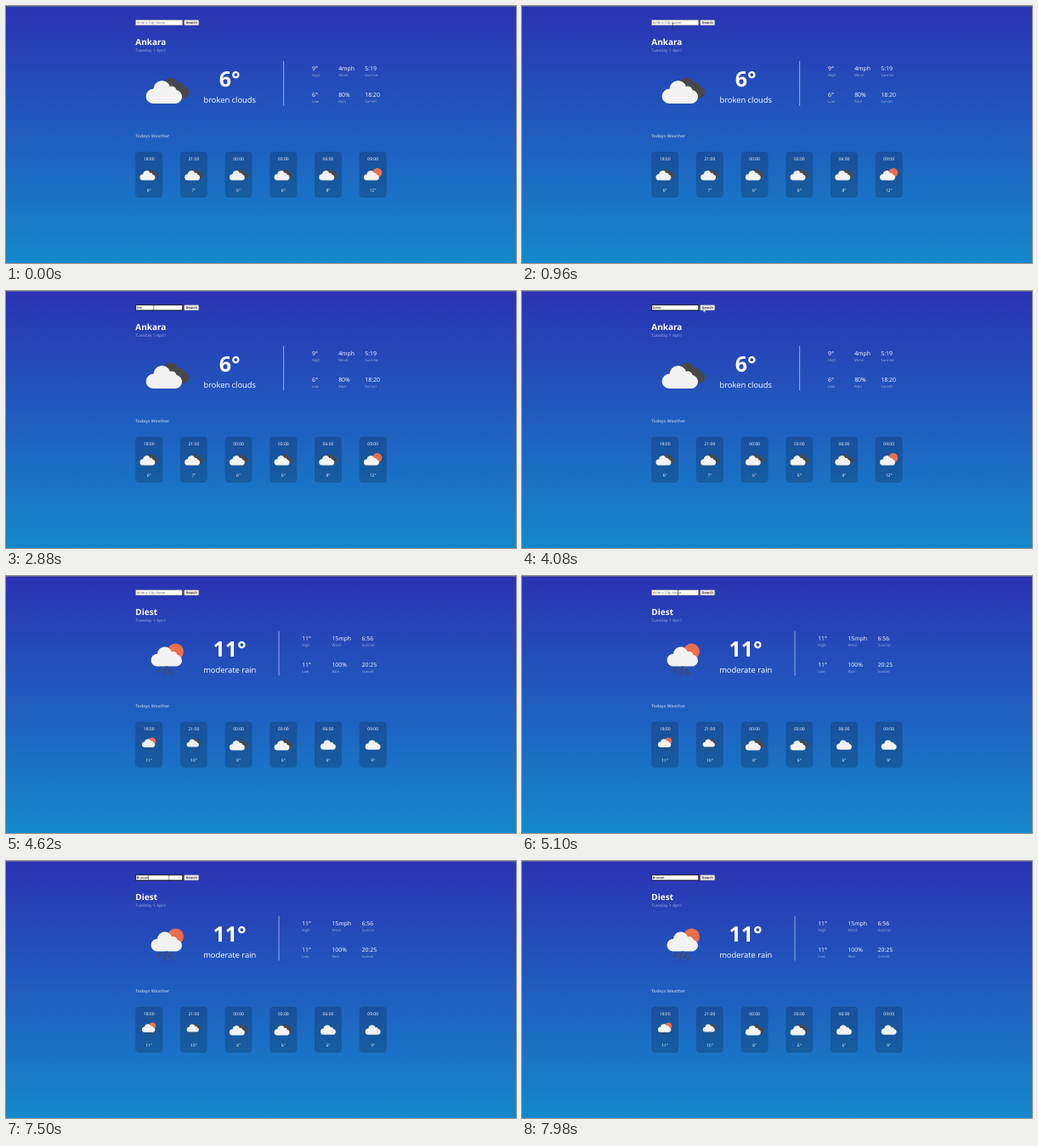
An HTML page that plays this animation: 600x303 px, repeating every 8 s.

```html
<!DOCTYPE html>
<html lang="en">
<head>
<meta charset="utf-8">
<title>Weather</title>
<style>
html, body { margin: 0; width: 100%; height: 100%; overflow: hidden; background: #2b32b2; }
svg { display: block; width: 100%; height: 100%; }
text { font-family: "Open Sans", "Noto Sans", sans-serif; fill: #fff; text-rendering: geometricPrecision; white-space: pre; }
.mid { text-anchor: middle; }
.dim { fill-opacity: .55; }
.form { font-family: "Liberation Sans", sans-serif; font-size: 4.17px; fill: #000; }
</style>
</head>
<body>
<svg id="stage" viewBox="0 0 600 303" preserveAspectRatio="none">
  <defs>
    <linearGradient id="sky" x1="0" y1="0" x2="0" y2="1">
      <stop offset="0" stop-color="#2b32b2"/>
      <stop offset="1" stop-color="#1488cc"/>
    </linearGradient>
    <path id="cloud" d="M9 28.5A8.6 8.6 0 0 1 9.5 11.3A10 10 0 0 1 29 8.5A5.5 5.5 0 0 1 36.5 12.5A8.1 8.1 0 0 1 35.8 28.5Z"/>
  </defs>
  <rect width="600" height="303" fill="url(#sky)"/>
  <rect width="600" height="1" fill="#888" opacity=".5"/>
  <rect id="field" x="152.6" y="16.4" width="55.2" height="6.4" fill="#fff"/>
  <text id="typed" class="form" x="153.6" y="21.1"></text>
  <rect id="caret" y="17.3" width=".4" height="4.8"/>
  <rect x="209.6" y="16.5" width="17.2" height="6.2" rx=".9" fill="#efefef" stroke="#767676" stroke-width=".4"/>
  <text class="form mid" x="218.2" y="21.1">Search</text>
  <g id="cities"></g>
  <g id="pointer">
    <path id="beam" d="M-1-3H1M0-3V3M-1 3H1" fill="none" stroke="#222" stroke-width=".5"/>
    <path id="arrow" d="M0 0V4.8L1.1 3.8L1.9 5.5L2.7 5.1L1.9 3.5H3.4Z" fill="#fff" stroke="#222" stroke-width=".3"/>
  </g>
</svg>
<script>
const LOOP = 8000, TICK = 60;
const $ = id => document.getElementById(id);

const text = (x, y, size, str, cls = '', weight = 400) =>
  `<text x="${x}" y="${y}" font-size="${size}" font-weight="${weight}" class="${cls}">${str}</text>`;

const cloud = (x, y, scale, dark) =>
  `<use href="#cloud" transform="translate(${x} ${y}) scale(${scale})" fill="${dark ? '#48484a' : '#f2f2f2'}"/>`;
const sun = (x, y, r) => `<circle cx="${x}" cy="${y}" r="${r}" fill="#ec6e4c"/>`;
const rain = '<path d="M-8 9l-3 5M-1 8l-3 5M-3 15l-1.5 3M4 10l-3 5M6 15l-1.5 3" stroke="#48484a" stroke-width="1.6" stroke-linecap="round"/>';

// Icons are drawn around their own centre at headline size
const icons = {
  broken: cloud(-14, -16, .91, true) + cloud(-26, -12.5, 1),
  sunny: sun(12, -5, 13) + cloud(-26, -12.5, 1),
  plain: cloud(-22, -14, 1),
  rainDay: sun(9.5, -10, 9.5) + cloud(-20, -17, .86) + rain,
  rainNight: cloud(-9, -18, .64, true) + cloud(-20, -16, .8) + rain
};
const icon = (name, x, y, scale) =>
  `<g transform="translate(${x} ${y}) scale(${scale})">${icons[name]}</g>`;

const labels = ['High', 'Wind', 'Sunrise', 'Low', 'Rain', 'Sunset'];
const hours = ['18:00', '21:00', '00:00', '03:00', '06:00', '09:00'];

const cities = [
  { name: 'Ankara', temp: 6, sky: 'broken clouds', icon: 'broken', line: 326.7, cols: [360, 391.2, 422.3],
    facts: ['9°', '4mph', '5:19', '6°', '80%', '18:20'], temps: [6, 7, 6, 6, 8, 12],
    icons: ['broken', 'broken', 'broken', 'broken', 'broken', 'sunny'] },
  { name: 'Diest', temp: 11, sky: 'moderate rain', icon: 'rainDay', line: 321, cols: [348.2, 383.4, 418.6],
    facts: ['11°', '15mph', '6:56', '11°', '100%', '20:25'], temps: [11, 10, 8, 6, 6, 9],
    icons: ['rainDay', 'rainNight', 'broken', 'broken', 'plain', 'plain'] }
];

function drawCity(c) {
  const facts = c.facts.map((fact, i) => {
    const x = c.cols[i % 3], y = i < 3 ? 75.6 : 107;
    return text(x, y, 6.875, fact) + text(x, y + 7.2, 4.375, labels[i], 'dim');
  });
  const cards = hours.map((hour, i) => {
    const x = 168.2 + i * 52.7;
    return `<rect x="${x - 16}" y="171.7" width="32" height="54.3" rx="4.2" fill-opacity=".19"/>` +
      text(x, 182.1, 5, hour, 'mid') + icon(c.icons[i], x, 198.7, .423) +
      text(x, 219.3, 5, c.temps[i] + '°', 'mid');
  });
  return '<g>' + text(152.3, 46, 10, c.name, '', 700) + text(152.3, 54.4, 5, 'Tuesday 1 April', 'dim') +
    icon(c.icon, 190, 99, 1) + text(263.2, 94.6, 25, c.temp + '°', 'mid', 700) +
    text(263.2, 114.3, 9.375, c.sky, 'mid') +
    `<rect x="${c.line - .3}" y="64.8" width=".7" height="52.6" fill="#fff" opacity=".75"/>` +
    facts.join('') + text(152.3, 154.6, 5, 'Todays Weather', 'dim', 700) + cards.join('') + '</g>';
}
$('cities').innerHTML = cities.map(drawCity).join('');
const views = [...$('cities').children];

// [time, field text]; null means unfocused with the placeholder
const typing = [
  [0, null], [1140, ''], [1320, 'D'], [1500, 'Di'], [1740, 'Dik'], [1980, 'Di'], [2340, 'Die'],
  [3120, 'Dies'], [3240, 'Diest'], [4500, null], [5340, ''], [6240, 'B'], [6420, 'Br'], [6540, 'Bru'],
  [6660, 'Brus'], [6780, 'Bruss'], [6900, 'Brusse'], [7020, 'Brussel']
];
// [time, x, y]
const path = [
  [900, 178, 24], [1140, 173.8, 20], [3360, 173.8, 20], [4080, 213.3, 20.3], [4200, 214, 20.5],
  [4440, 214, 20.5], [5040, 183.5, 19.3], [7200, 183.5, 19.3], [7980, 208.6, 21]
];

function pointerAt(t) {
  const i = path.findIndex(p => p[0] > t);
  if (i < 0) return path.at(-1).slice(1);
  if (i === 0) return null;
  const [t0, x0, y0] = path[i - 1], [t1, x1, y1] = path[i];
  const u = (t - t0) / (t1 - t0), ease = u * u * (3 - 2 * u);
  return [x0 + (x1 - x0) * ease, y0 + (y1 - y0) * ease];
}

const show = (el, on) => el.setAttribute('visibility', on ? 'visible' : 'hidden');

function render(now) {
  const t = Math.floor((now % LOOP) / TICK) * TICK;
  const [since, value] = typing.findLast(step => step[0] <= t);
  const focused = value !== null;
  $('typed').textContent = focused ? value : 'Write a City Name';
  $('typed').style.fill = focused ? '#000' : '#757575';
  $('field').setAttribute('stroke', focused ? '#151515' : '#767676');
  $('field').setAttribute('stroke-width', focused ? .9 : .5);
  $('caret').setAttribute('x', 153.7 + (value ? $('typed').getComputedTextLength() : 0));
  show($('caret'), focused && (t - since) % 1000 < 500);

  views.forEach((view, i) => show(view, i === (t >= 4500 ? 1 : 0)));

  const at = pointerAt(t);
  show($('pointer'), at);
  if (at) {
    const overField = at[0] < 208.8;
    $('pointer').setAttribute('transform', `translate(${at[0]} ${at[1]})`);
    $('beam').style.display = overField ? '' : 'none';
    $('arrow').style.display = overField ? 'none' : '';
  }
}

const start = performance.now();
function frame() {
  render(performance.now() - start);
  requestAnimationFrame(frame);
}
frame();
</script>
</body>
</html>
```
